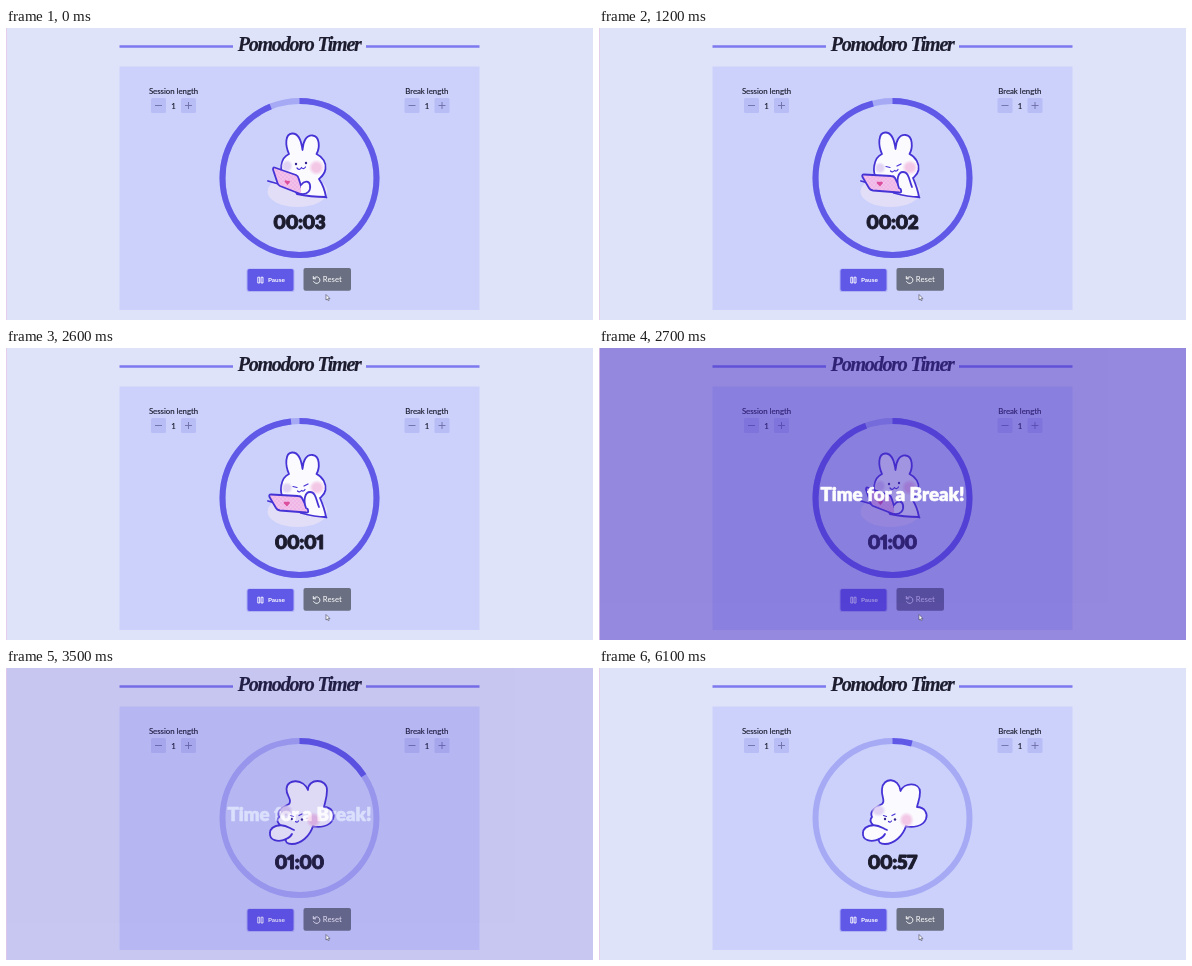
These frames come from a looping animation (587x292 px, 6200 ms). An HTML page:

```html
<!DOCTYPE html>
<html lang="en">
<head>
<meta charset="utf-8">
<title>Pomodoro Timer</title>
<style>
  html, body { margin: 0; width: 100%; height: 100%; overflow: hidden; background: #dfe3fa; }
  svg { display: block; width: 587px; height: 292px; }
  text { font-family: Lato, "Open Sans", sans-serif; fill: #1c1c2e; text-anchor: middle; }
  .title { font: italic 700 20px "Liberation Serif", "Noto Serif", serif; letter-spacing: -1.2px; stroke: #1c1c2e; stroke-width: .2px; }
  .label { font-size: 7.8px; stroke: #1c1c2e; stroke-width: .15px; }
  .clock { font-size: 19px; font-weight: 900; font-variant-numeric: proportional-nums; letter-spacing: -.5px; stroke: #1c1c2e; stroke-width: .9px; stroke-linejoin: round; }
  .btn { fill: #fff; text-anchor: start; }
  .notice { font-size: 18.7px; font-weight: 900; fill: #fff; stroke: #fff; stroke-width: .6px; stroke-linejoin: round; }
  .ring { fill: none; stroke-width: 6px; }
  .step { fill: #b8bdf6; }
  .sign { stroke: #6c6fa8; stroke-width: .9px; fill: none; }
  .icon { stroke: #fff; stroke-width: .9px; fill: none; stroke-linecap: round; stroke-linejoin: round; }
  .ink { stroke: #4633d6; stroke-width: 1.8px; stroke-linecap: round; stroke-linejoin: round; fill: none; }
  .thin { stroke-width: 1.2px; }
  .body { fill: #fafaff; }
  .laptop { fill: url(#speckle); }
  .dots { fill: #33258f; }
  .heart { fill: #dc4f9d; }
</style>
</head>
<body>
<svg viewBox="0 0 587 292">
  <defs>
    <g id="stepper">
      <rect class="step" x="-22.5" y="70" width="15" height="15" rx="1.5"/>
      <rect class="step" x="7.5" y="70" width="15" height="15" rx="1.5"/>
      <path class="sign" d="M-18.500 77.500h7M11.500 77.500h7M15 74v7"/>
      <text class="label" y="80.500">1</text>
    </g>
    <radialGradient id="blush">
      <stop offset=".5" stop-color="#f3c8e6"/>
      <stop offset="1" stop-color="#f3c8e6" stop-opacity="0"/>
    </radialGradient>
    <radialGradient id="shade">
      <stop offset=".5" stop-color="#e0d3f3"/>
      <stop offset="1" stop-color="#e0d3f3" stop-opacity="0"/>
    </radialGradient>
    <pattern id="speckle" width="4" height="4" patternUnits="userSpaceOnUse">
      <rect width="4" height="4" fill="#f3c0ea"/>
      <circle cx="1" cy="1" r=".7" fill="#e6a4df"/>
      <circle cx="3" cy="3" r=".7" fill="#e6a4df"/>
    </pattern>
  </defs>

  <rect width="587" height="292" fill="#dfe3fa"/>
  <path d="M113.500 18.500H227M360 18.500H473.500" stroke="#7d79ee" stroke-width="2.400"/>
  <text class="title" x="293.200" y="23">Pomodoro Timer</text>

  <rect x="113.500" y="38.500" width="360" height="243.500" fill="#cbd1fb"/>
  <text class="label" x="167.500" y="65.500">Session length</text>
  <text class="label" x="420.800" y="65.500">Break length</text>
  <use href="#stepper" x="167.500"/>
  <use href="#stepper" x="421"/>

  <circle class="ring" cx="293.500" cy="150" r="77" stroke="#a6aaf5"/>
  <circle class="ring" id="arc" cx="293.500" cy="150" r="77" stroke="#6059e8" pathLength="360" transform="rotate(-90 293.500 150)"/>

  <g id="work">
    <ellipse cx="291.500" cy="163.500" rx="30" ry="15.500" fill="#e2def8"/>
    <path class="ink" d="M262 153L320.500 169.500"/>
    <g id="workUp">
      <path class="ink body" d="M283 126C279 117 279 106 286 105.500C293 105 295.500 114 296.500 122C297 114 300 107 306.500 107.500C314 108 314 120 310.500 126C317 129 320.500 135 319.500 141C318.500 147 315 149 313 151C317 157 319 163 320 169C311 169 300 168 291 166C288 160 284 154 279 150C273 144 274 130 283 126Z"/>
      <ellipse cx="281" cy="138" rx="6" ry="6.500" fill="url(#shade)"/>
      <ellipse cx="310.500" cy="139.500" rx="8" ry="8" fill="url(#blush)"/>
      <g class="dots"><circle cx="290" cy="136" r="1.200"/><circle cx="300" cy="135" r="1.200"/></g>
      <path class="ink thin" d="M291 140Q293.500 143 295.500 139.500Q297.500 142 299.500 139"/>
      <path class="ink laptop" d="M268.500 139.500L290 147Q292 148 292.500 150L297 164Q297.500 167 294.500 166L274 158Q272 157 271.500 155L267 141.500Q267 139 268.500 139.500Z"/>
      <path class="heart" d="M281.500 157L278.500 153.500Q279 151.500 281.500 153Q284 152 284 154Z"/>
      <path class="ink body" d="M295 166C302 167 305 162 304 157C303 152 298 153 295 157"/>
    </g>
    <g id="workDown">
      <path class="ink body" d="M283 126C279 117 279 105 286 104.500C293 104 295.500 113 296.500 121C297 113 300 106.500 306.500 107C314 107.500 314 120 310.500 126C317 129 320.500 136 319.500 142C318.500 147 316 148 314 150C317 157 319 163 320 169C311 169 302 167 295 165C288 160 282 155 278 151C273 145 274 130 283 126Z"/>
      <ellipse cx="281" cy="140" rx="6" ry="6" fill="url(#shade)"/>
      <ellipse cx="311" cy="139.500" rx="8" ry="7.500" fill="url(#blush)"/>
      <path class="ink thin" d="M287 138.500L291 139.500M298 138L302 136M291.500 143Q293.500 145 295.500 142.500Q297.500 144 299 141.500"/>
      <path class="ink laptop" d="M265 146.500L292 148Q295 148 296 150L302 162Q303 165 300 164.500L274 162.500Q271 162 270 160L263.500 149Q262.500 146.500 265 146.500Z"/>
      <path class="heart" d="M281 158.500L277.500 155Q278 152.500 280.500 154Q283.500 152.500 284 155Z"/>
      <path class="ink body" d="M300 160C297 152 299 144 304 144C310 144 310 152 313 159"/>
    </g>
  </g>

  <g id="rest">
    <path class="ink body" id="sleeper"/>
    <ellipse cx="279.500" cy="142.500" rx="7.500" ry="6.500" fill="url(#shade)"/>
    <ellipse cx="307.500" cy="152" rx="7.500" ry="8" fill="url(#blush)"/>
    <g class="dots"><circle cx="286" cy="151" r="1.200"/><circle cx="296" cy="151.500" r="1.200"/></g>
    <path class="ink thin" d="M284.500 147.500L287.500 148.500M293 147.500L296 146M289.500 153.500Q291 155 292.500 153"/>
    <path class="ink" d="M273 157.500C279 156 283 160 288 162M280 171C283 170 285 168 286 166"/>
  </g>

  <text class="clock" id="clock" x="293.300" y="201"></text>

  <rect x="240.500" y="240.500" width="48" height="23.500" rx="2.500" fill="#b0b2f4"/>
  <rect x="241.500" y="241" width="46" height="22" rx="2" fill="#6058e7"/>
  <path class="icon" d="M252.200 249.200h1.500v5.800h-1.500zM255.500 249.200h1.500v5.800h-1.500z"/>
  <text class="btn" x="262" y="254.300" font-size="6.400" font-weight="700">Pause</text>
  <rect x="297.500" y="240" width="47.500" height="22.700" rx="2" fill="#6a7081"/>
  <path class="icon" d="M307.700 250.500A3.300 3.300 0 1 1 307.600 253.600M307.300 248.500V250.800H309.600"/>
  <text class="btn" x="316.800" y="254.400" font-size="7.800">Reset</text>

  <g id="overlay">
    <rect width="587" height="292" fill="#4529c0" fill-opacity=".5"/>
    <text class="notice" x="293.500" y="153">Time for a Break!</text>
  </g>
  <path d="M.4 0V292" stroke="#e6c6e6" stroke-width=".8"/>
  <path d="M320 266.500V272L321.300 270.900L322.200 272.700L323.200 272.200L322.300 270.500H323.900Z" fill="#fff" stroke="#44455a" stroke-width=".6"/>
</svg>

<script>
  const LOOP = 6200, STEP = 100, TICK = 660, SWITCH = 2660, FADE = 1200;
  const $ = id => document.getElementById(id);
  const show = (id, on) => $(id).style.display = on ? '' : 'none';

  const EARS = {
    left: 'C287 133 282 129 283 121C284 109 300 109 301.500 123C305 114 321 114 321 124C321 131 319 134 318 139',
    right: 'C287 132 280 128 280.500 121C281 110 298 111 302 122C302 110 321 110 321 122C321 130 319 134 318 139'
  };
  const sleeper = ears => 'M273 149C270 143 277 139 283 136' + ears +
    'C326 139 329 146 327 151C324 159 312 160 307 158C304 168 295 176 286 176' +
    'C281 176 279 174 280 171C272 175 263 172 264 165C264 160 268 158 274 157C271 154 271 151 273 149Z';

  // Each tick sets a new target that the ring reaches linearly one second later.
  function arcAngle(t) {
    const since = (t - SWITCH) / 1000;
    if (since < 0) return 354 + 6 * since;
    return since < 1 ? 354 * (1 - since) : 6 * (since - 1);
  }

  function clockText(t) {
    const ticks = Math.floor((t - TICK) / 1000) + 1;
    if (ticks < 3) return '00:0' + (3 - ticks);
    return ticks === 3 ? '01:00' : '00:' + (63 - ticks);
  }

  function draw(now) {
    const t = Math.floor(now % LOOP / STEP) * STEP;
    const phase = t % 1000;
    const resting = t > 2750;

    $('arc').setAttribute('stroke-dasharray', arcAngle(t) + ' 360');
    $('clock').textContent = clockText(t);

    const down = phase > 150 && phase < 650;
    show('work', !resting);
    show('rest', resting);
    show('workUp', !down);
    show('workDown', down);
    $('sleeper').setAttribute('d', sleeper(phase > 350 && phase < 850 ? EARS.right : EARS.left));

    const age = t - SWITCH;
    $('overlay').setAttribute('opacity', age < 0 ? 0 : Math.max(0, 1 - age / FADE));
  }

  const start = performance.now();
  (function frame() {
    draw(performance.now() - start);
    requestAnimationFrame(frame);
  })();
</script>
</body>
</html>
```
